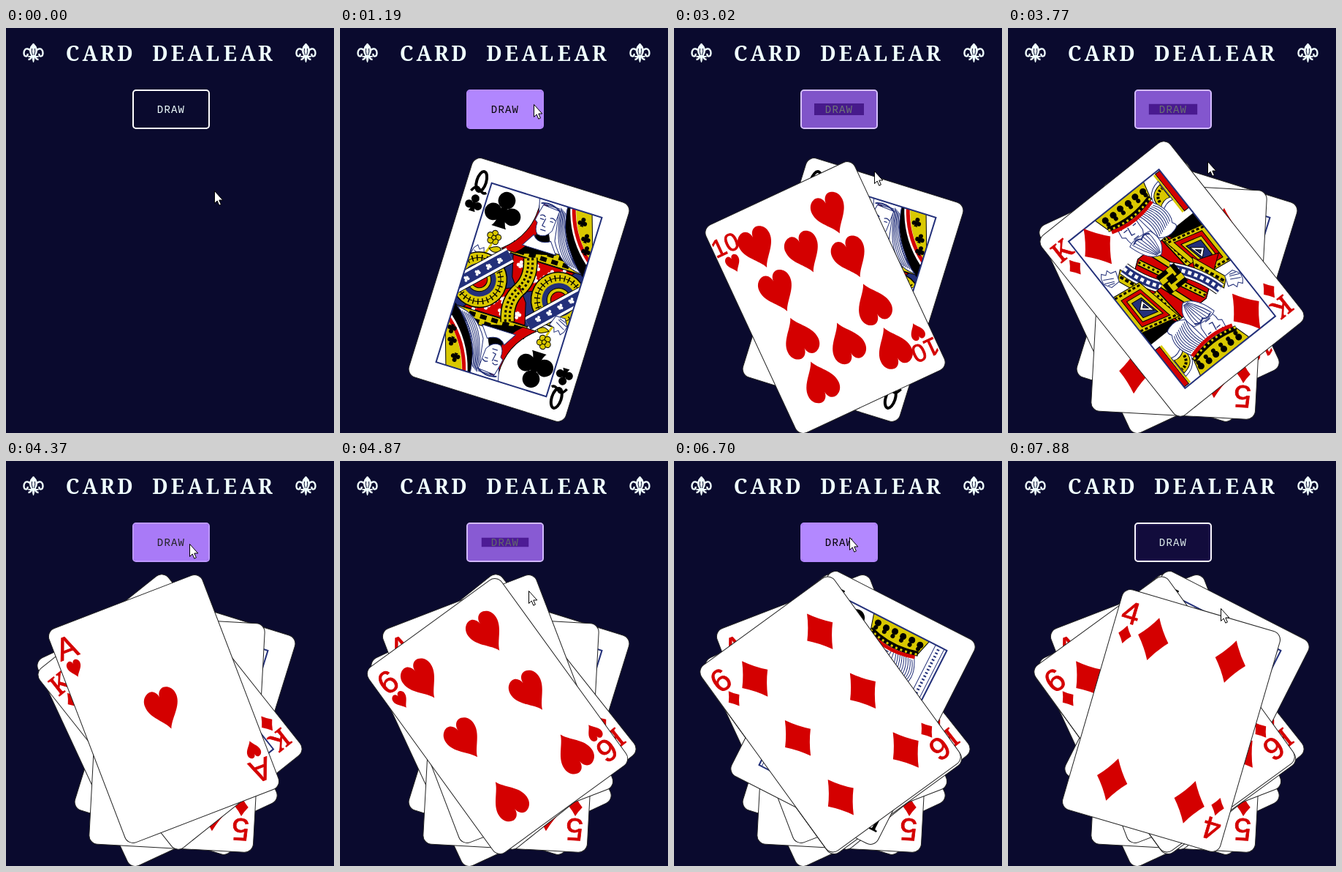
Write an HTML page that moves like this. It is 449 px wide and 553 px high and loops after 8000 ms.

```html
<!DOCTYPE html>
<html lang="en">
<head>
<meta charset="utf-8">
<title>Card dealer</title>
<style>
  html, body { margin: 0; width: 100%; height: 100%; overflow: hidden; background: #0a0a2e; }
  #stage { position: relative; width: 449px; height: 553px; overflow: hidden; }
  svg { position: absolute; left: 0; top: 0; }
  #title { font: bold 28px "Noto Serif", serif; text-anchor: middle; fill: azure; }
  #button {
    position: absolute; left: 173px; top: 84px; width: 106px; height: 54px;
    box-sizing: border-box; border: 2px solid; border-radius: 5px;
    font: 14px/52px "Liberation Mono", monospace; letter-spacing: 1.2px; text-align: center;
  }
</style>
</head>
<body>
<div id="stage">
  <div id="button">DRAW</div>
  <svg id="table" width="449" height="553"></svg>
</div>
<script>
const LOOP = 8000, FADE = 800;
const RED = '#d40000', GOLD = '#d9c800', BLUE = '#23307a', BLACK = '#000', WHITE = '#fff';

// ---- drawing helpers ----
const at = (x, y, body, extra = '') => `<g transform="translate(${x} ${y}) ${extra}">${body}</g>`;
const both = body => body + `<g transform="rotate(180)">${body}</g>`;
const fill = (d, color, line = BLACK) => `<path d="${d}" fill="${color}" stroke="${line}" stroke-width="1"/>`;
const line = (d, color = BLUE, width = 1, dash = '') =>
  `<path d="${d}" fill="none" stroke="${color}" stroke-width="${width}" stroke-dasharray="${dash}"/>`;
const disc = (x, y, r, color, stroke = BLACK, width = 1) =>
  `<circle cx="${x}" cy="${y}" r="${r}" fill="${color}" stroke="${stroke}" stroke-width="${width}"/>`;
const repeat = (n, make) => Array.from({ length: n }, (_, i) => make(i)).join('');

// ---- heading ----
const heading = 'CARD DEALEAR';
const lilySide = line('M-2 4C-3-8-13-8-13 0C-13 6-7 6-8 1M-3 5Q-3 9-7 9', 'azure', 2.4);
const lily = lilySide + `<g transform="scale(-1 1)">${lilySide}</g>`
  + fill('M0-13Q9-5 2 5L0 13L-2 5Q-9-5 0-13Z', 'azure', 'azure')
  + line('M-2-6Q-3-2-1 3M2-6Q3-2 1 3', '#0a0a2e') + line('M-7 5H7', 'azure', 2);
const title = `<text id="title" y="45" x="${[...heading].map((_, i) => 91 + 24 * i).join(' ')}">${heading}</text>`
  + at(37.5, 34, lily) + at(410.5, 34, lily);

// ---- suits and ranks ----
const shapes = {
  diamond: '<path d="M0-30Q9-13.5 21.5 0Q9 13.5 0 30Q-9 13.5-21.5 0Q-9-13.5 0-30Z"/>',
  heart: '<path d="M0 29C-5 16-23 5-23-12C-23-24-14-28-10-28C-4-28 0-22 0-16C0-22 4-28 10-28C14-28 23-24 23-12C23 5 5 16 0 29Z"/>',
  club: '<circle cy="-13" r="11.5"/><circle cx="-13" cy="6" r="11.5"/><circle cx="13" cy="6" r="11.5"/><path d="M-4-6H4Q4 17 10 24H-10Q-4 17-4-6Z"/>'
};
const pip = (suit, x, y, scale = 1, color = suit === 'club' ? BLACK : RED) =>
  at(x, y, `<g fill="${color}">${shapes[suit]}</g>`, `scale(${scale})`);

const rankFonts = { K: '36px Noto Serif, serif', 10: '34px Liberation Sans, sans-serif' };

function index(rank, suit) {
  const color = suit === 'club' ? BLACK : RED;
  const font = rankFonts[rank] || '43px Liberation Sans, sans-serif';
  const letter = rank === 'Q'
    ? `<ellipse cx="-93" cy="-126" rx="6.5" ry="14" fill="none" stroke="${color}" stroke-width="4"/>`
      + line('M-103-110Q-98-121-92-115T-82-113', color, 3.5)
    : `<text x="-94" y="-111" text-anchor="middle" fill="${color}" stroke="${color}" stroke-width=".8" style="font:${font}">${rank}</text>`;
  return letter + pip(suit, -94, -95, suit === 'club' ? .48 : .42);
}

// ---- court figures, one half each ----
const face = fill('M-12-24Q-16-8-17 0L-13 3Q-14 14-8 19Q4 22 11 8L13-22Z', WHITE, BLUE)
  + line('M-12-8Q-8-12-4-8M3-8Q7-11 11-7M-11-4H-5M4-4H9M-3-6L-5 5L0 6M-6 11H2', BLUE, 1.3);

const band = shape => line('M26 42L86-20', BLACK, 24) + line('M26 42L86-20', WHITE, 22) + line('M26 42L86-20', BLUE, 15)
  + repeat(4, i => pip(shape, 37 + i * 12, 30 - i * 12.4, .17, WHITE));

const flower = line('M-62-30Q-55-40-54-54', GOLD, 3)
  + repeat(5, i => disc(-54 + 6 * Math.sin(i * 1.257), -58 - 6 * Math.cos(i * 1.257), 4, GOLD))
  + disc(-54, -58, 3, GOLD) + fill('M-56-42Q-42-52-40-44Q-47-35-56-42Z', GOLD);

const hand = (x, y) => at(x, y, fill('M-11-8L-7-13L-3-8L2-12L4-6L11-4L6 10L-7 10L-13 0Z', WHITE, BLUE)
  + line('M-10-5L3 2M-12 0L1 6M-9 5L0 8'));

function queenHalf() {
  const checks = fill('M-26-62H74V-45H-26Z', GOLD)
    + line('M-25-58H74', BLACK, 6, '9 7') + line('M-17-50H74', BLACK, 6, '9 7');
  const bodice = fill('M-22-44H66L38-12L0 4L-14-14Z', RED)
    + [[-8, -34], [14, -36], [36, -34], [52, -40], [16, -20], [28, -24]].map(([x, y]) => pip('club', x, y, .22, WHITE)).join('');
  const ring = disc(56, -3, 30, BLUE, BLACK, 17) + disc(56, -3, 30, BLUE, GOLD, 14)
    + line('M56-33A30 30 0 1 0 57-33', BLACK, 8, '1.5 5') + line('M56-33A30 30 0 1 0 57-33', BLACK, 1)
    + disc(56, -3, 16, GOLD) + disc(56, -3, 11, RED);
  const veil = fill('M34-128H65L79-85V-58Q52-82 34-128Z', GOLD)
    + fill('M26-128H37Q50-88 79-62V-42Q42-70 26-128Z', BLACK)
    + line('M38-128Q49-89 80-63', WHITE, 8) + line('M39-128Q50-90 80-65', RED, 5)
    + [[56, -114], [67, -94], [72, -78]].map(([x, y]) => pip('club', x, y, .26)).join('');
  const robe = fill('M-8-128Q-2-78-40-47H-20Q10-74 2-128Z', RED) + fill('M-20-47Q12-74 2-128L12-96Q22-66 34-60Z', BLACK);
  const hair = fill('M-10-128H30Q35-74 74-46Q44-48 27-78L20-122H-2L-4-104Z', WHITE, BLUE)
    + repeat(6, i => line(`M${22 + i * 1.5}-${124 - i}Q${27 + i}-${70 + i * 4} ${54 + i * 3}-${52 - i * .5}`));
  const girdle = 'M2-46Q12-20 0 0';
  return bodice + ring + band('club') + checks + robe + veil + hair + at(9, -98, face, 'scale(.95)')
    + line('M-6-122Q8-128 23-118', BLUE, 2) + fill('M-3-78Q6-66 22-76L34-60H-14Z', WHITE, BLUE)
    + line(girdle, BLACK, 20) + line(girdle, GOLD, 17) + line(girdle, BLACK, 9, '3 3') + line(girdle, GOLD, 3)
    + flower + hand(-65, -29);
}

function kingHalf(suit) {
  const crown = fill('M-33-128H52L46-106Q8-96-27-107Z', GOLD)
    + repeat(6, i => disc(-22 + i * 13, -119 + (i % 2), 4, BLACK) + disc(-22 + i * 13, -112, 2.5, BLACK))
    + line('M-27-107Q8-95 46-106', BLACK, 7) + line('M-27-106Q8-94 46-105', GOLD, 3, '3 4')
    + line('M-25-101Q8-89 44-100', RED, 5);
  const curls = fill('M15-95L43-100Q58-76 48-60Q54-52 44-50Q30-46 20-56Z', WHITE, BLUE)
    + repeat(9, i => line(`M${18 + i * 3}-95Q${27 + i * 3.3}-${72 + i} ${20 + i * 3.3}-${55 + i}`));
  const beard = fill('M-18-70Q-8-76 17-70Q26-48 9-35Q-9-38-18-70Z', WHITE, BLUE)
    + repeat(7, i => line(`M${-14 + i * 4.6}-70Q${-8 + i * 4}-54 ${4 + i}-38`)) + line('M-12-69Q-4-74 1-68Q8-74 14-67', BLUE, 2);
  const weapon = suit === 'club'
    ? fill('M62-128H75V-42H62Z', WHITE, BLUE) + line('M68-124V-46', BLUE, 4, '2 3') + line('M58-48H79', GOLD, 5)
    : fill('M71-126H79V-62H71Z', RED) + line('M69-126V-62', GOLD, 3)
      + fill('M68-116Q38-112 46-78Q58-88 68-84Z', WHITE, BLUE)
      + fill('M67-111Q43-108 48-85Q58-93 67-89Z', GOLD) + line('M52-92Q54-105 66-105', BLACK, 4, '3 2');
  const sleeve = fill('M30-52H79V-28L36-42Z', BLACK) + fill('M24-46L79-32V30L38 24Z', GOLD)
    + line('M27-42L79-29M40 21L79 27', BLACK, 3, '4 3')
    + fill('M33-37L73-26V20L43 16Z', RED) + fill('M39-29L68-21V14L46 11Z', GOLD)
    + fill('M43-23L64-17V8L49 6Z', BLUE) + fill('M46-18L61-6L51 3Z', WHITE) + fill('M50-11L56-6L52-3Z', BLUE);
  const collarPath = 'M-43-52Q-34-16-6 14';
  const collar = line(collarPath, BLACK, 18) + line(collarPath, WHITE, 16) + line(collarPath, BLUE, 11)
    + line(collarPath, WHITE, 5, '5 4');
  const coat = fill('M-20-50H40L28 0H-40L-72-12Z', RED)
    + line('M-22-46L2 4M0-44L16 2M26-50L30 0', BLACK, 9) + line('M-22-46L2 4M0-44L16 2M26-50L30 0', GOLD, 6)
    + line('M-22-46L2 4M26-50L30 0', BLACK, 3, '3 4');
  const cuff = fill('M-60-44L-48-54L-30-14L-40 6Z', GOLD) + line('M-54-46L-36-2', BLACK, 4, '5 3');
  return coat + sleeve + cuff + collar + weapon + curls + at(-1, -86, face, 'scale(1.05)') + beard + crown + hand(-65, -52);
}

const queenCloth = fill('M-79 0L-25-45L-22-60H72L79-45V0L25 45L22 60H-72L-79 45Z', BLUE);
const kingCloth = fill('M-60-20L-20-50H40L79-38V10L60 20L20 50H-40L-79 38V-10Z', RED);
const kingHeart = fill('M-15-15H15V15H-15Z', BLACK) + line('M-15-5H5V-15M15 5H-5V15', GOLD, 8) + fill('M-5-5H5V5H-5Z', BLACK);

function court(rank, suit) {
  const figure = rank === 'Q'
    ? queenCloth + both(queenHalf())
    : kingCloth + both(kingHalf(suit)) + kingHeart;
  return `<g clip-path="url(#frame)">${figure}</g>`
    + `<rect x="-79" y="-128" width="158" height="256" fill="none" stroke="${BLUE}" stroke-width="2"/>`
    + both(pip(suit, -52, -98, 1.03));
}

// Pips that stand upright in the upper half, then those on the middle line.
const layouts = {
  A: [[], [0]],
  4: [[[-55, -100], [55, -100]], []],
  5: [[[-55, -100], [55, -100]], [0]],
  6: [[[-55, -100], [55, -100]], [-55, 55]],
  10: [[[-55, -100], [55, -100], [-55, -34], [55, -34], [0, -67]], []]
};

function number(rank, suit) {
  const [upper, middle] = layouts[rank];
  return both(upper.map(([x, y]) => pip(suit, x, y)).join('')) + middle.map(x => pip(suit, x, 0)).join('');
}

function cardArt([, x, y, angle, rank, suit]) {
  const art = 'QK'.includes(rank) ? court(rank, suit) : number(rank, suit);
  return `<g class="card" transform="translate(${x} ${y}) rotate(${angle})">
    <rect x="-112.5" y="-156.5" width="225" height="313" rx="12" fill="#fff" stroke="#222"/>
    ${art}${both(index(rank, suit))}</g>`;
}

// ---- timeline: dealt at, centre, angle, face ----
const cards = [
  [1070, 245, 357.5, 17.3, 'Q', 'club'],
  [2320, 207, 368, -25, '10', 'heart'],
  [3290, 234, 372.5, 3.1, '5', 'diamond'],
  [3530, 224.5, 342.5, -38.5, 'K', 'diamond'],
  [4250, 216, 338.5, -21, 'A', 'heart'],
  [4490, 215.5, 348.5, -36, '6', 'heart'],
  [6310, 245, 337, 27, 'K', 'club'],
  [6700, 214, 346, -36, '6', 'diamond'],
  [6820, 223.5, 354.5, 16.3, '4', 'diamond']
];

// Times at which the pointer enters and leaves the button, alternating.
const toggles = [540, 1300, 1920, 2550, 2700, 2850, 3100, 3575, 3950, 4670, 5270, 7345];

const pointerPath = [
  [0, 285, 222], [380, 285, 222], [540, 276, 119], [930, 266, 105], [1240, 265, 104],
  [1500, 290, 180], [1790, 313, 241], [1910, 255, 124], [2200, 243, 105], [2320, 244, 106],
  [2450, 271, 130], [2600, 254, 158], [2760, 250, 110], [2900, 270, 160], [3020, 274, 196],
  [3170, 256, 120], [3290, 250, 112], [3530, 255, 116], [3650, 270, 165], [3770, 273, 182],
  [3890, 272, 175], [4010, 255, 116], [4500, 250, 112], [4730, 258, 177], [5130, 258, 177],
  [5270, 250, 128], [5380, 240, 104], [7100, 240, 104], [7250, 246, 118], [7430, 280, 170],
  [7610, 290, 201], [7760, 291, 201]
];

// CSS "ease", cubic-bezier(.25, .1, .25, 1)
function ease(x) {
  if (x >= 1) return 1;
  let low = 0, high = 1, u = 0;
  for (let i = 0; i < 20; i++) {
    u = (low + high) / 2;
    const bx = .75 * u * (1 - u) ** 2 + .75 * u * u * (1 - u) + u ** 3;
    if (bx < x) low = u; else high = u;
  }
  return .3 * u * (1 - u) ** 2 + 3 * u * u * (1 - u) + u ** 3;
}

function hoverAt(time, last = toggles.length - 1) {
  while (last >= 0 && toggles[last] > time) last--;
  if (last < 0) return 0;
  const from = hoverAt(toggles[last], last - 1);
  const to = last % 2 ? 0 : 1;
  return from + (to - from) * ease((time - toggles[last]) / FADE);
}

function pointerAt(time) {
  const next = pointerPath.findIndex(key => key[0] > time);
  if (next < 0) return pointerPath[pointerPath.length - 1].slice(1);
  const [t0, x0, y0] = pointerPath[next - 1], [t1, x1, y1] = pointerPath[next];
  const part = (time - t0) / (t1 - t0);
  return [Math.round(x0 + (x1 - x0) * part), Math.round(y0 + (y1 - y0) * part)];
}

const mix = (a, b, p) => `rgb(${a.map((v, i) => Math.round(v + (b[i] - v) * p))})`;

document.getElementById('table').innerHTML =
  '<defs><clipPath id="frame"><rect x="-79" y="-128" width="158" height="256"/></clipPath></defs>'
  + title + cards.map(cardArt).join('')
  + '<path id="pointer" d="M.5.5V17.5L4.2 14L6.8 20.2L9.4 19L6.8 13H11.8Z" fill="#fff" stroke="#000"/>';

const button = document.getElementById('button');
const pointer = document.getElementById('pointer');
const cardNodes = document.querySelectorAll('.card');

function draw(now) {
  const time = now % LOOP;
  const p = hoverAt(time);
  button.style.backgroundColor = `rgba(125,40,222,${p})`;
  button.style.boxShadow = `inset 0 0 0 ${32 * p}px rgba(179,136,255,${p})`;
  button.style.borderColor = mix([255, 255, 255], [179, 136, 255], p);
  button.style.color = mix([240, 255, 255], [0, 0, 0], p);
  cardNodes.forEach((node, i) => { node.style.display = time >= cards[i][0] ? '' : 'none'; });
  pointer.setAttribute('transform', `translate(${pointerAt(time)})`);
}

const start = performance.now();
function tick() {
  draw(performance.now() - start);
  requestAnimationFrame(tick);
}
tick();
</script>
</body>
</html>
```
